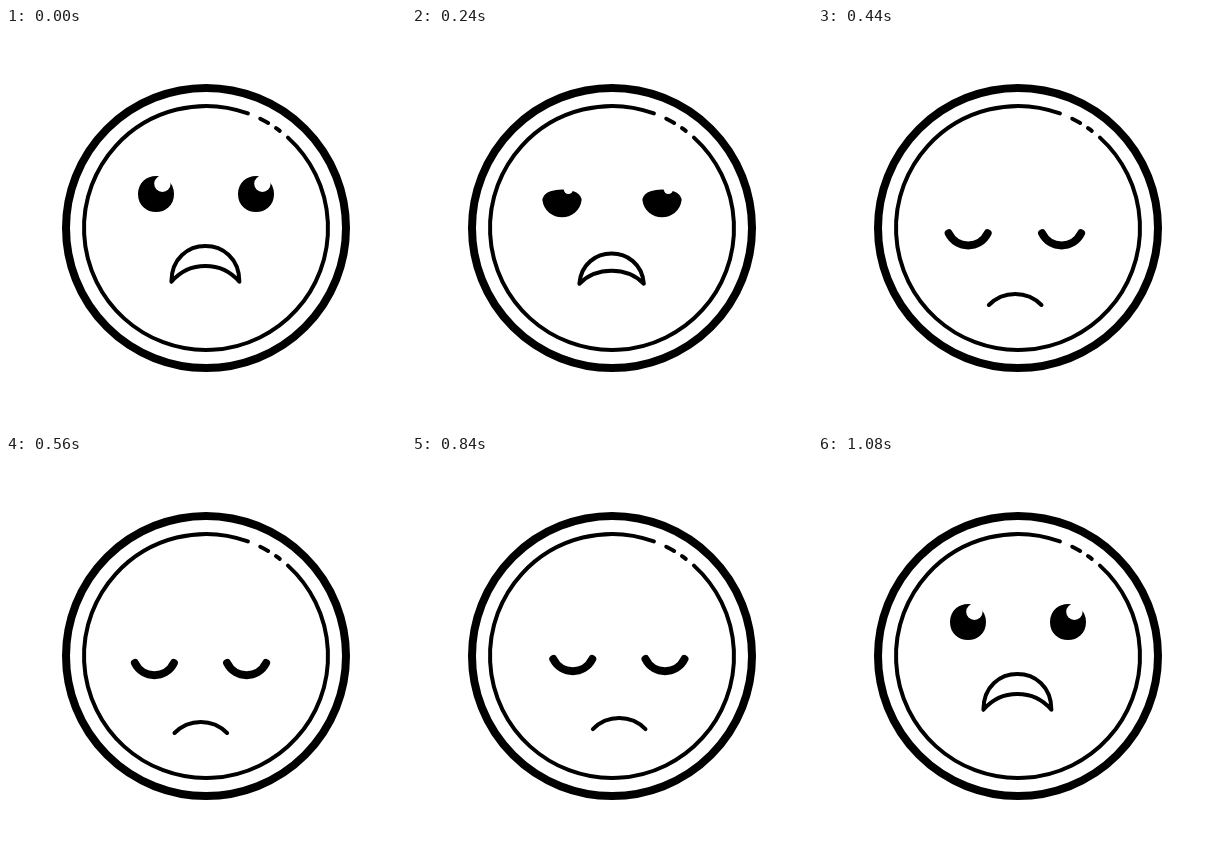
An HTML page for the animation above (1.12 s loop, 400 by 400 pixels).

```html
<!DOCTYPE html>
<html lang="en">
<head>
<meta charset="utf-8">
<title>Sad face</title>
<style>
  html, body { margin: 0; width: 100%; height: 100%; overflow: hidden; background: #fff; }
  svg { display: block; width: 100%; height: 100%; }
  .line { fill: none; stroke: #000; stroke-linecap: round; stroke-linejoin: round; }
  .thick { stroke-width: 8; }
  .thin { stroke-width: 4; }
  .eye { fill: #000; }
  .mouth, .shine { fill: #fff; }
</style>
</head>
<body>
<svg viewBox="0 0 400 400">
  <circle class="line thick" cx="200" cy="200" r="140"/>
  <circle class="line thin" cx="200" cy="200" r="122" pathLength="360"
    stroke-dasharray="337.9 6.3 4.2 4.4 2.2 5" transform="rotate(-47.8 200 200)"/>
  <path class="line thick eye"/>
  <path class="line thick eye"/>
  <circle class="shine"/>
  <circle class="shine"/>
  <path class="line thin mouth"/>
</svg>
<script>
const LOOP = 1120, STEP = 40;

// Crescents: half width, then inset and height of the handles of both edges.
const openEye = { half: 14, inA: 0, bendA: -18.7, inB: 0, bendB: 18.7 };
const shutEye = { half: 19.5, inA: 8, bendA: 16.2, inB: 8, bendB: 16.2 };
const openMouth = { half: 34, inA: 0, bendA: -47.7, inB: 18, bendB: -21 };
const shutMouth = { half: 26.3, inA: 14.5, bendA: -14.7, inB: 14.5, bendB: -14.7 };

const lerp = (a, b, u) => a + (b - a) * u;

function mix(a, b, u) {
  const shape = {};
  for (const key in a) shape[key] = lerp(a[key], b[key], u);
  return shape;
}

function ease(t, from, to) {
  const u = Math.min(1, Math.max(0, (t - from) / (to - from)));
  return u * u * (3 - 2 * u);
}

// Goes from 0 to 1 between the given times and back to 0 as the face reopens.
const shut = (t, from, to) => ease(t, from, to) * (1 - ease(t, 940, 1080));

function crescent(x, y, s) {
  const l = x - s.half, r = x + s.half;
  return `M${l} ${y}C${l + s.inA} ${y + s.bendA} ${r - s.inA} ${y + s.bendA} ${r} ${y}`
    + `C${r - s.inB} ${y + s.bendB} ${l + s.inB} ${y + s.bendB} ${l} ${y}Z`;
}

const eyes = document.querySelectorAll('.eye');
const shines = document.querySelectorAll('.shine');
const mouth = document.querySelector('.mouth');

function draw(now) {
  const t = Math.floor((now % LOOP) / STEP) * STEP;

  const lids = shut(t, 150, 400);
  const lips = shut(t, 150, 440);
  const hop = t < 320 ? 4.8 * Math.sin(Math.PI * t / 320) : 0;
  const lift = 5.8 * ease(t, 640, 960) * lips;
  const headX = 200 - 5.5 * ease(t, 320, 540) + 14.8 * ease(t, 560, 780) - 9.3 * ease(t, 780, 960);

  const eyeY = 166 + 41 * shut(t, 160, 480) - lift - hop * 0.2;
  const spread = 50 - 3.9 * shut(t, 320, 480);
  const eyeShape = mix(openEye, shutEye, lids);
  [-1, 1].forEach((side, i) => {
    const x = headX + side * spread;
    eyes[i].setAttribute('d', crescent(x, eyeY, eyeShape));
    shines[i].setAttribute('cx', x + 6.4);
    shines[i].setAttribute('cy', eyeY - 10.2);
    shines[i].setAttribute('r', 8.2 * Math.max(0, 1 - 1.5 * lids));
  });

  const mouthShape = mix(openMouth, shutMouth, lips);
  mouthShape.bendB += hop * 0.7;
  const mouthX = headX + lerp(-0.6, 0.3, lips);
  const mouthY = 253.8 + 23.2 * lips - lift - hop;
  mouth.setAttribute('d', crescent(mouthX, mouthY, mouthShape));
}

const start = performance.now();
function tick() {
  draw(performance.now() - start);
  requestAnimationFrame(tick);
}
tick();
</script>
</body>
</html>
```
